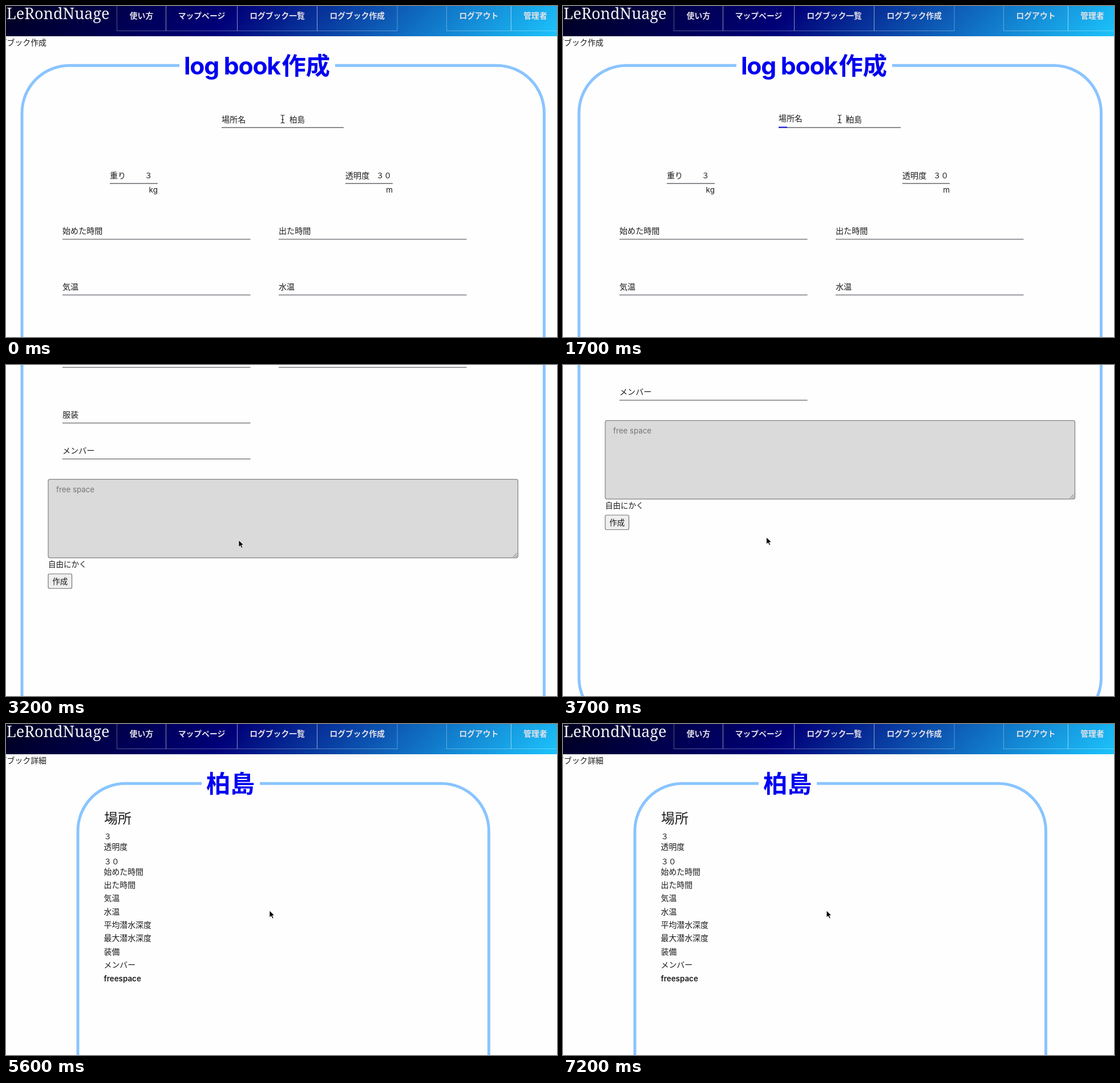
An HTML page for the animation above (7300 ms loop, 966 by 580 pixels).

```html
<!DOCTYPE html>
<html lang="ja">
<head>
<meta charset="utf-8">
<title>Log book</title>
<style>
html, body { margin: 0; width: 100%; height: 100%; overflow: hidden; background: #fefefe; }
svg { display: block; }
text { font: 14.1px Inter, "Noto Sans CJK JP", "Noto Sans CJK", sans-serif; fill: #1c1c1e; white-space: pre; }
.brand { font: 500 27px "Noto Serif", serif; fill: #f2f2f4; }
.nav { font-size: 13.8px; font-weight: 700; fill: #e6e2e8; }
.title { font-size: 42.6px; font-weight: 700; fill: #0000f0; letter-spacing: -.2px; }
.value { font-size: 13.5px; }
.place { font-size: 24px; }
.hint { font-size: 13.3px; fill: #757575; }
.detail { font-size: 13.9px; }
.strong { font-size: 13.4px; font-weight: 600; }
.end { text-anchor: end; }
.mid { text-anchor: middle; }
.rule { stroke: #66646c; stroke-width: 1.3; }
.frame { fill: none; stroke: #8ac4ff; stroke-width: 5; }
.cell { fill: none; stroke: #fff; stroke-opacity: .65; stroke-dasharray: 1 1; }
</style>
</head>
<body>
<svg id="stage" width="966" height="580" viewBox="0 0 966 580"></svg>
<script>
const DURATION = 7300, STEP = 100;
const FOCUS = [[1600, 0], [1700, .07], [1800, .45], [1900, .85], [2000, 1], [2600, 1], [2800, 0]];
const SCROLL = [[2800, 0], [2900, 64], [3000, 240], [3100, 440], [3200, 600], [3300, 660], [3400, 690], [3500, 703]];
const POINTER_X = [[2300, 485], [2600, 408], [3600, 408], [4200, 100], [4700, 100], [4900, 164], [5300, 462]];
const POINTER_Y = [[2300, 198], [2600, 307], [3600, 307], [4200, 277], [4700, 277], [4900, 281], [5300, 327]];
const CLICK = 4800, LOADED = 5300;

const text = (x, y, s, cls = '') => `<text x="${x}" y="${y}" class="${cls}">${s}</text>`;
const rule = (x1, x2, y) => `<path class="rule" d="M${x1} ${y}H${x2}"/>`;
const field = (x, width, y, label) => text(x, y - 9.3, label) + rule(x, x + width, y);
const cell = (x, width, label) =>
  `<rect class="cell" x="${x + .5}" y="-1.5" width="${width}" height="45"/>` +
  text(x + width / 2 + .5, 21.5, label, 'nav mid');
const frame = (x, width, gapX, gapWidth) =>
  `<rect class="frame" x="${x}" y="104.3" width="${width}" height="1230" rx="83"/>
   <rect x="${gapX}" y="95" width="${gapWidth}" height="20" fill="#fefefe"/>`;

const header = crumb => `
  <rect width="966" height="53" fill="url(#sea)"/>
  ${text(1, 22.5, 'LeRondNuage', 'brand')}
  ${cell(194, 86, '使い方')}${cell(280, 125, 'マップページ')}${cell(405, 140, 'ログブック一覧')}
  ${cell(545, 140.5, 'ログブック作成')}${cell(772, 113, 'ログアウト')}${cell(885, 85, '管理者')}
  ${text(71, 69, crumb, 'detail end')}`;

const form = `
  ${header('ログブック作成')}
  ${frame(28, 915.5, 304, 273)}
  <text x="312" y="119.5" class="title"><tspan letter-spacing="-1.2">log book</tspan></text>
  ${text(568, 119.5, '作成', 'title end')}
  ${rule(378, 592, 213)}
  <g id="placeLabel">${text(0, 0, '場所名')}</g>
  <path id="focusLine" stroke="#1212e6" stroke-width="2"/>
  ${text(497, 203.5, '柏島', 'value')}
  <path id="caret" d="M497.5 191V205" stroke="#222"/>
  ${field(182, 84, 311, '重り')}${text(243, 301.5, '３', 'value')}${text(266, 327, 'kg', 'value end')}
  ${field(595, 83, 311, '透明度')}${text(649, 301.5, '３０', 'value')}${text(678, 327, 'm', 'value end')}
  ${[['始めた時間', '出た時間'], ['気温', '水温'], ['平均潜水時間', '最大深度']].map(([a, b], i) =>
    field(99, 329.5, 408.7 + i * 97.7, a) + field(478, 329.5, 408.7 + i * 97.7, b)).join('')}
  ${field(99, 329.5, 701.7, '服装')}${field(99, 329.5, 764.7, 'メンバー')}
  <rect x="74" y="800.3" width="823.5" height="137.5" rx="3" fill="#dadada" stroke="#808080" stroke-width="1.2"/>
  <path d="M889 936.5L896 929.5M893 936.5L896 933.5" stroke="#666"/>
  ${text(88, 823, 'free space', 'hint')}
  ${text(74, 953.5, '自由にかく', 'value')}
  <g id="button">
    <rect x="74" y="966" width="41.5" height="25.5" rx="2.5" fill="#efefef" stroke="#767676" stroke-width="1.2"/>
    ${text(94.7, 983.8, '作成', 'value mid')}
  </g>`;

const detail = `
  ${header('ログブック詳細')}
  ${frame(126, 720.5, 343, 102)}
  ${text(351, 119.5, '柏島', 'title')}
  ${text(172, 173.5, '場所', 'place')}
  ${text(171.5, 201.5, '３', 'value')}${text(171.5, 219.7, '透明度', 'detail')}
  ${text(171.5, 245.5, '３０', 'value')}
  ${['始めた時間', '出た時間', '気温', '水温', '平均潜水深度', '最大潜水深度', '装備', 'メンバー']
    .map((s, i) => text(171.5, 263.7 + i * 23.35, s, 'detail')).join('')}
  ${text(171.5, 450.5, 'freespace', 'strong')}`;

const $ = id => document.getElementById(id);
$('stage').innerHTML = `
  <defs><linearGradient id="sea" gradientUnits="userSpaceOnUse" x1="0" y1="0" x2="509.5" y2="509.5">
    <stop stop-color="#000020"/><stop offset=".4" stop-color="#000078"/><stop offset="1" stop-color="#1cc4fc"/>
  </linearGradient></defs>
  <g id="form">${form}</g>
  <g id="detail">${detail}</g>
  <path id="beam" d="M-3.5-7Q0-7 0-5Q0-7 3.5-7M0-5V5M-3.5 7Q0 7 0 5Q0 7 3.5 7M-2 1H2" fill="none" stroke="#222" stroke-width="1.2"/>
  <path id="arrow" d="M0 0V12L2.9 9.4L5 14L7 13.1L5 8.6H8.8Z" fill="#000" stroke="#fff" stroke-width=".8"/>`;

function at(keys, t) {
  const i = keys.findIndex(k => k[0] > t);
  if (i < 0) return keys[keys.length - 1][1];
  if (i === 0) return keys[0][1];
  const [t0, a] = keys[i - 1], [t1, b] = keys[i];
  return a + (b - a) * (t - t0) / (t1 - t0);
}

const show = (id, on) => $(id).setAttribute('visibility', on ? 'visible' : 'hidden');
const move = (id, x, y, scale = 1) => $(id).setAttribute('transform', `translate(${x} ${y}) scale(${scale})`);

function render(t) {
  const focus = at(FOCUS, t), x = at(POINTER_X, t), y = at(POINTER_Y, t);
  $('form').style.display = t < LOADED ? '' : 'none';
  $('detail').style.display = t < LOADED ? 'none' : '';
  move('form', 0, -at(SCROLL, t));
  move('placeLabel', 378, 203.7 - 22 * focus, 1 - .2 * focus);
  $('focusLine').setAttribute('d', `M378 212.5h${214 * focus}`);
  show('focusLine', focus > 0);
  show('caret', t >= 1700 && t < 2600);

  const [box, label] = $('button').children, disabled = t >= CLICK;
  box.style.stroke = disabled ? '#cbcbcb' : '';
  label.style.fill = disabled ? '#a2a2a2' : '';

  const overField = t < 2600 && y < 214;
  show('beam', overField);
  show('arrow', !overField);
  move('beam', x, y);
  move('arrow', x, y);
}

function tick(now) {
  render(Math.floor(now % DURATION / STEP) * STEP);
  requestAnimationFrame(tick);
}
requestAnimationFrame(tick);
</script>
</body>
</html>
```
